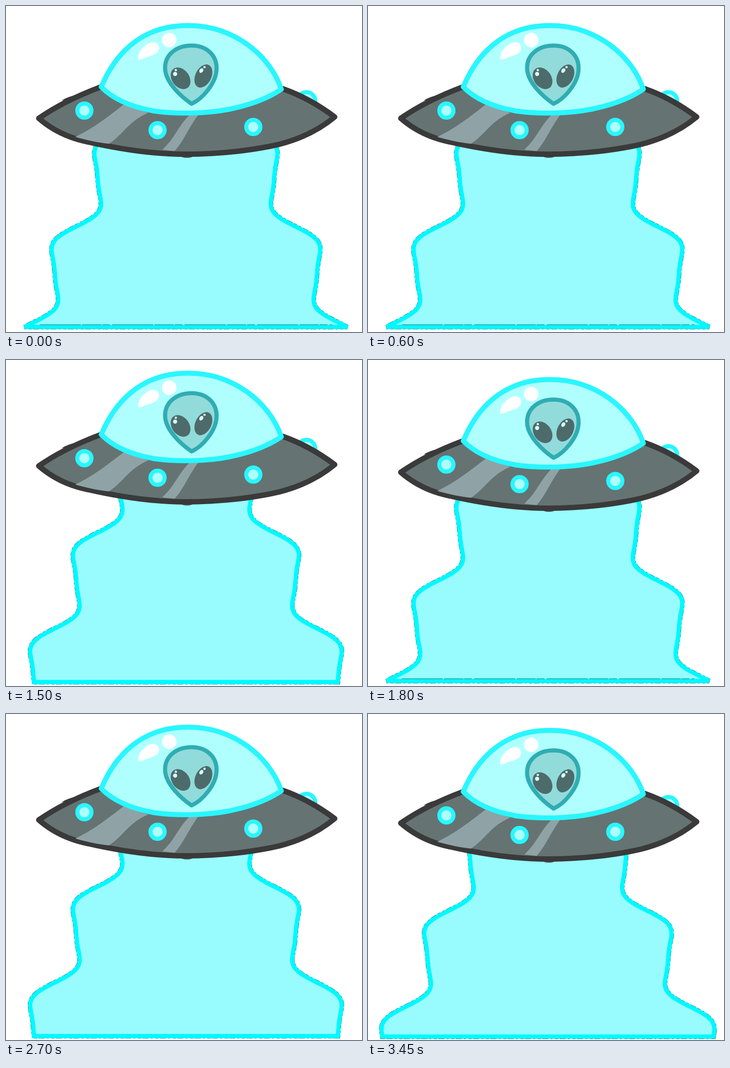
Animation of 781 by 717 pixels, one loop 3600 ms. Source, as an HTML page:

```html
<!DOCTYPE html>
<html lang="en">
<head>
<meta charset="utf-8">
<title>Flying saucer</title>
<style>
  html, body { margin: 0; width: 100%; height: 100%; overflow: hidden; background: #fff; }
  svg { display: block; width: 100%; height: 100%; }
  .beam { visibility: hidden; animation: show 600ms step-end infinite; }
  .light { fill: #98fcff; stroke: #00f8ff; stroke-width: 9.5; stroke-miterlimit: 2; }
  .rim { fill: none; stroke: #14393c; stroke-width: 10.4; stroke-miterlimit: 2; stroke-dasharray: 7 3 13 5 4 6; }
  .seam { fill: none; stroke: #176064; stroke-dasharray: 90 3 42 2 17 5; }
  #ship { animation: bob 600ms step-end infinite; }
  .hull { fill: #657373; stroke: #3a3a3a; stroke-width: 12; stroke-linejoin: round; }
  .shine { fill: #8fa3a6; }
  .glass { fill: #b0ffff; stroke: #29f6ff; stroke-width: 11; stroke-linejoin: round; }
  .lamp { fill: #b0ffff; stroke: #29f6ff; stroke-width: 9; }
  .head { fill: #92dbdb; stroke: #2fadb3; stroke-width: 9; stroke-linejoin: round; }
  .eye { fill: #4d6b6b; }
  .white { fill: #fff; }
  .glint { fill: #d8ffff; }
  @keyframes show { 0% { visibility: visible; } 25%, 100% { visibility: hidden; } }
  @keyframes bob {
    0%, 100% { transform: translateY(0); }
    25%, 75% { transform: translateY(-7px); }
    50% { transform: translateY(-14px); }
  }
</style>
</head>
<body>
<svg viewBox="0 0 781 717">
  <g id="beams"></g>
  <path class="beam seam" d="M74 701H716"/>
  <g id="ship">
    <circle class="lamp" cx="659" cy="209" r="19.5"/>
    <path fill="#3a3a3a" d="M122 208Q138 198 152 197L150 205Z"/>
    <ellipse cx="397" cy="330" rx="13" ry="4" fill="#555"/>
    <path class="hull" d="M72 247C112 219 160 196 208 178L607 182C650 197 689 220 721 244C690 270 650 291 600 304C545 317 470 326 394 326C325 326 250 315 180 299C140 291 104 275 72 247Z"/>
    <path class="shine" d="M152 288C193 268 222 245 258 217L312 235C268 254 260 280 226 303C198 300 173 294 152 288Z"/>
    <path class="shine" d="M402 240L422 239C399 270 392 294 370 319L343 316C371 290 376 267 402 240Z"/>
    <path class="glass" d="M209 178C235 115 290 42 400 43C500 42 580 110 604 183C572 205 530 219 490 227C440 237 375 238 325 231C280 223 238 208 209 178Z"/>
    <path class="white" d="M290 117C289 103 297 94 307 86C322 75 336 79 336 93C335 109 310 110 301 116Q294 119 290 117Z"/>
    <circle class="white" cx="358" cy="75" r="16"/>
    <path class="head" d="M407 215C385 200 349 168 349 136C349 106 375 87 407 87C440 87 462 108 462 137C462 170 430 205 407 215Z"/>
    <ellipse class="eye" cx="383" cy="159" rx="19" ry="26" transform="rotate(-36 383 159)"/>
    <ellipse class="eye" cx="433" cy="154" rx="17.5" ry="27" transform="rotate(26 433 154)"/>
    <g class="glint">
      <circle cx="371" cy="149.5" r="4.5"/>
      <circle cx="372.5" cy="141" r="2.5"/>
      <ellipse cx="428.5" cy="142" rx="4" ry="5.5" transform="rotate(35 428.5 142)"/>
      <circle cx="435.5" cy="134.5" r="2.5"/>
    </g>
    <circle class="lamp" cx="172" cy="230" r="15.5"/>
    <circle class="lamp" cx="332.5" cy="273" r="15.5"/>
    <circle class="lamp" cx="542.5" cy="266" r="15.5"/>
  </g>
</svg>
<script>
  const AXIS = 394.7, TOP = 290;
  const POSES = 4, STEP = 150;
  const PERIOD = 211, SWELL = 35, SKEW = 0.5;

  // A widening cone with a skewed sine wave that runs down it, one period per cycle.
  function halfWidth(y, pose) {
    const a = 2 * Math.PI * ((y - 485) / PERIOD - pose / POSES);
    return 176 + 0.445 * (y - 340) + SWELL * Math.sin(a + SKEW * Math.sin(a));
  }

  function outline(pose) {
    const floor = 706 + 1.2 * pose;
    const left = [], right = [];
    for (let i = 0; i <= 100; i++) {
      const y = TOP + (floor - TOP) * i / 100;
      const w = halfWidth(y, pose);
      left.push(`${(AXIS - w).toFixed(1)} ${y.toFixed(1)}`);
      right.unshift(`${(AXIS + w).toFixed(1)} ${y.toFixed(1)}`);
    }
    return 'M' + left.concat(right).join('L');
  }

  function beam(pose) {
    const d = outline(pose);
    return `<g class="beam" style="animation-delay:${(pose - POSES) * STEP}ms">
      <path class="rim" d="${d}"/><path class="light" d="${d}"/></g>`;
  }

  document.getElementById('beams').innerHTML =
    Array.from({ length: POSES }, (_, pose) => beam(pose)).join('');
</script>
</body>
</html>
```
